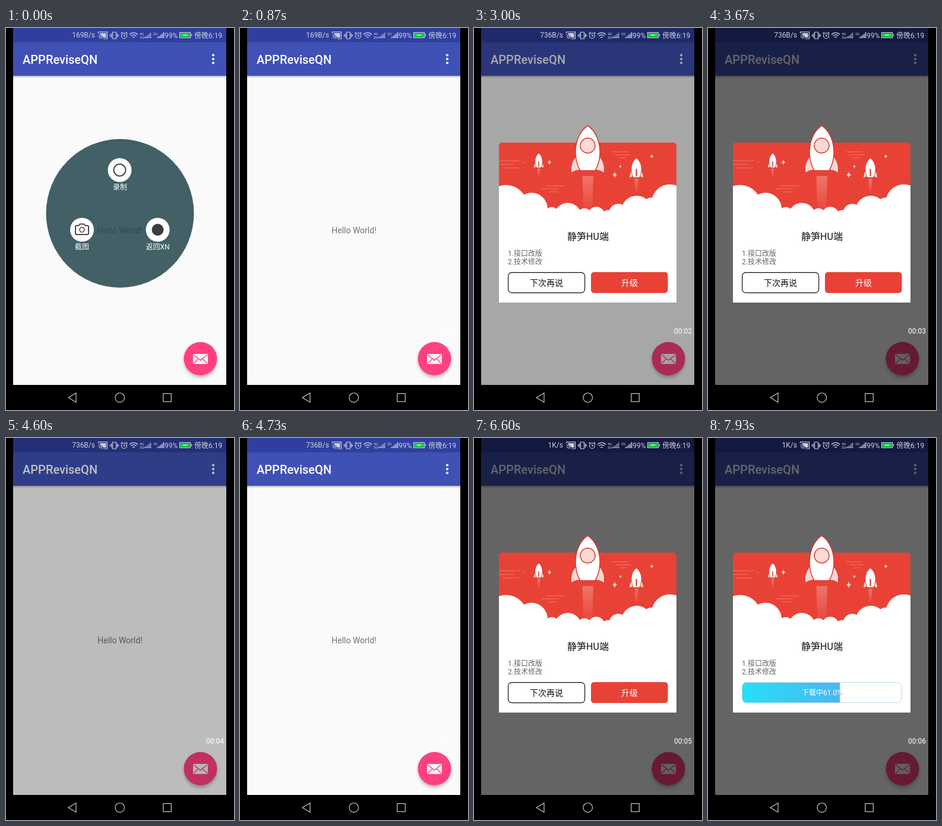
These frames come from a looping animation (384 by 640 pixels, 8000 ms). An HTML page:

```html
<!DOCTYPE html>
<html lang="zh">
<head>
<meta charset="utf-8">
<title>Update dialog</title>
<style>
html, body { margin: 0; width: 100%; height: 100%; overflow: hidden; background: #000; }
#stage { position: relative; width: 384px; height: 640px; overflow: hidden; background: #000;
  font: 12px Roboto, "Noto Sans CJK SC", "Noto Sans CJK", sans-serif; }
#stage > *, .dialog > * { position: absolute; }
svg { left: 0; top: 0; display: block; }
.mid { text-anchor: middle; }

.scrim { animation: scrim 8s linear infinite; }
@keyframes scrim {
  0%, 35.875% { opacity: 0; }
  36.7% { opacity: .2; }
  39.125%, 55% { opacity: .6; }
  57.5% { opacity: .25; }
  59.125%, 75.875% { opacity: 0; }
  76.625% { opacity: .2; }
  79.125%, 100% { opacity: .6; }
}

.menu { transform-origin: 192px 311px; animation: close 8s linear infinite; }
@keyframes close {
  0%, .5% { opacity: 1; transform: none; }
  2.5%, 100% { opacity: 0; transform: scale(.75); }
}

.ripple { fill: #fff; opacity: 0; transform-origin: 327.5px 554px; animation: ripple 8s linear infinite; }
@keyframes ripple {
  0%, 32.7% { opacity: 0; transform: scale(.3); }
  34% { opacity: .2; transform: scale(.8); }
  35.8% { opacity: .15; transform: scale(1); }
  36.7% { opacity: 0; transform: scale(1); }
  36.8%, 72.4% { opacity: 0; transform: scale(.3); }
  73.5% { opacity: .2; transform: scale(.8); }
  75% { opacity: .15; transform: scale(1); }
  76.4%, 100% { opacity: 0; transform: scale(1); }
}

.dialog { left: 0; top: 0; width: 384px; height: 640px; animation: dialog 8s linear infinite; }
@keyframes dialog {
  0%, 35.8% { opacity: 0; }
  36.7%, 55% { opacity: 1; }
  57.4%, 75.6% { opacity: 0; }
  76.6%, 100% { opacity: 1; }
}

/* One-line windows onto a column of lines */
.window { height: 14px; line-height: 14px; overflow: hidden; white-space: nowrap; }
.window > div { animation: 8s step-end infinite; }
.speed { left: 90px; top: 5px; width: 60px; text-align: right; color: #ccd0dc; }
.speed > div { animation-name: speed; }
@keyframes speed {
  0% { transform: none; }
  25% { transform: translateY(-14px); }
  62.5%, 100% { transform: translateY(-28px); }
}
.timer { left: 337px; top: 501px; color: #fff; animation: recording 8s step-end infinite; }
.timer > div { animation-name: seconds; }
@keyframes recording { 0% { opacity: 0; } 10.875%, 100% { opacity: 1; } }
@keyframes seconds {
  0% { transform: none; }
  20.875% { transform: translateY(-14px); }
  32.5% { transform: translateY(-28px); }
  45% { transform: translateY(-42px); }
  55.875% { transform: translateY(-56px); }
  72.5% { transform: translateY(-70px); }
  90%, 100% { transform: translateY(-84px); }
}

.choice { animation: choice 8s step-end infinite; }
@keyframes choice { 0% { visibility: visible; } 90%, 100% { visibility: hidden; } }
.bar { left: 57px; top: 409px; width: 270px; height: 35px; border-radius: 8px; overflow: hidden;
  background: #fff; color: #8fb9d8; animation: bar 8s step-end infinite; }
@keyframes bar { 0% { visibility: hidden; } 90%, 100% { visibility: visible; } }
.bar::after { content: ""; position: absolute; inset: 0; border: 1px solid #bcd9ea; border-radius: 8px; }
.fill { position: absolute; left: 0; top: 0; height: 35px; overflow: hidden; color: #fff;
  background: linear-gradient(90deg, #25e0f8, #4cb6f0); animation: fill 8s infinite; }
@keyframes fill {
  0% { width: 0; animation-timing-function: step-end; }
  92.5% { width: 0; animation-timing-function: steps(8, jump-start); }
  99.125%, 100% { width: 164.7px; }
}
.bar .window { position: absolute; left: 0; top: 11px; width: 270px; text-align: center; }
.bar .window > div { animation: percent 8s infinite; }
@keyframes percent {
  0% { transform: none; animation-timing-function: step-end; }
  92.5% { transform: none; animation-timing-function: steps(8, jump-start); }
  99.125%, 100% { transform: translateY(-112px); }
}
</style>
</head>
<body>
<div id="stage">
  <svg width="384" height="640">
    <defs>
      <linearGradient id="shade" x2="0" y2="1">
        <stop stop-color="#000" stop-opacity=".28"/><stop offset="1" stop-color="#000" stop-opacity="0"/>
      </linearGradient>
      <filter id="blur" x="-30%" y="-30%" width="160%" height="160%"><feGaussianBlur stdDeviation="3"/></filter>
    </defs>
    <rect x="12" y="80" width="359" height="518" fill="#fafafa"/>
    <text class="mid" x="192" y="344" font-size="14" fill="#737373">Hello World!</text>
    <rect x="12" width="359" height="24" fill="#303f9f"/>
    <rect x="12" y="24" width="359" height="56" fill="#3f51b5"/>
    <rect x="12" y="80" width="359" height="4" fill="url(#shade)"/>
    <g fill="#fff">
      <text x="28" y="60" font-size="20" font-weight="500">APPReviseQN</text>
      <circle cx="349" cy="45.5" r="2.1"/><circle cx="349" cy="52" r="2.1"/><circle cx="349" cy="58.5" r="2.1"/>
    </g>

    <circle cx="327.5" cy="558" r="27" opacity=".3" filter="url(#blur)"/>
    <circle cx="327.5" cy="554" r="28" fill="#ff4081"/>
    <circle class="ripple" cx="327.5" cy="554" r="28"/>
    <rect x="315" y="546" width="25" height="17" rx="1.5" fill="#f2f2f2"/>
    <path d="M316 547.5L327.5 556.5L339 547.5M316 562L323.5 554.5M339 562L331.5 554.5"
      fill="none" stroke="#ff4081" stroke-width="1.4"/>
    <rect class="scrim" x="12" width="359" height="598"/>

    <!-- status icons -->
    <g fill="none" stroke="#ccd0dc" stroke-width="1.2">
      <path d="M155.5 9V6.5H170.5V18H164M155.5 11.5a6.5 6.5 0 0 1 6.5 6.5M155.5 14.5a3.5 3.5 0 0 1 3.5 3.5"/>
      <path d="M158.5 9H168V15.5H164.5Z" fill="#ccd0dc"/>
      <path d="M179.5 7H185.5V18H179.5ZM177.5 9V16M187.5 9V16M175.5 11V14M189.3 11V14"/>
      <circle cx="199" cy="13" r="4.5"/>
      <path d="M199 10.5V13.3H201M193.5 9.5L196 7M202 7L204.500 9.5"/>
      <path d="M208 11a9.5 9.5 0 0 1 14 0M210.5 13.5a6 6 0 0 1 9 0M213 16a3 3 0 0 1 4 0"/>
      <path d="M233.5 17V15M236 17V13.5M238.5 17V12M241 17V10M243.5 17V8" stroke-width="1.5" stroke-dasharray="2 .6"/>
      <path d="M255.5 17V15M258 17V13.5M260.5 17V11.5M263 17V9.5M265.5 17V7" stroke-width="1.5"/>
      <path d="M292.5 7.5H310.5V16.5H292.5ZM312.5 10V14"/>
    </g>
    <rect x="293.5" y="8.5" width="16" height="7" fill="#12d048"/>
    <path d="M298 12H305" stroke="#e8ffe8" stroke-width="1.3"/>
    <g fill="#ccd0dc">
      <text x="225" y="11.5" font-size="6">4G</text>
      <text x="225" y="18" font-size="6">2G</text>
      <text x="248" y="11.5" font-size="6">2G</text>
      <text x="267" y="17">99%</text>
      <text x="317" y="17">傍晚6:19</text>
    </g>

    <!-- navigation bar -->
    <g fill="none" stroke="#ccc" stroke-width="1.2">
      <path d="M118 611.5V627L105 619.3Z"/><circle cx="191.7" cy="619.3" r="7.8"/>
      <rect x="264.8" y="612.5" width="13.5" height="13.5"/>
    </g>
  </svg>

  <div class="window speed"><div>169B/s<br>736B/s<br>1K/s</div></div>

  <svg class="menu" width="384" height="640">
    <circle cx="192" cy="310.5" r="124.5" fill="#22454c" fill-opacity=".85"/>
    <g fill="#fff">
      <circle cx="191.5" cy="238" r="20"/><circle cx="128" cy="338" r="20"/><circle cx="255.5" cy="338" r="20"/>
      <g class="mid">
        <text x="192" y="271">录制</text><text x="128" y="371">截图</text><text x="255.5" y="371">返回XN</text>
      </g>
    </g>
    <g fill="none" stroke="#4a4a4a" stroke-width="2">
      <circle cx="191.5" cy="238" r="10"/>
      <path d="M119 331H122.5L124.5 328.5H131.5L133.5 331H137a2 2 0 0 1 2 2V344a2 2 0 0 1-2 2H119a2 2 0 0 1-2-2V333a2 2 0 0 1 2-2Z"/>
      <circle cx="128" cy="338" r="4" stroke-width="1.6"/>
    </g>
    <circle cx="255.5" cy="338" r="10" fill="#3c3c3c"/>
  </svg>

  <div class="dialog">
    <svg width="384" height="640">
      <defs>
        <linearGradient id="flame" x2="0" y2="1">
          <stop stop-color="#f0857a" stop-opacity=".75"/><stop offset="1" stop-color="#f0857a" stop-opacity=".1"/>
        </linearGradient>
        <clipPath id="card"><path d="M42 460V197a5 5 0 0 1 5-5H336a5 5 0 0 1 5 5V460Z"/></clipPath>
        <path id="spark" d="M0-5Q.6-.6 4 0Q.6.6 0 5Q-.6.6-4 0Q-.6-.6 0-5"/>
        <g id="mini" stroke="#d8382c" stroke-width=".8">
          <path d="M-3 32H3L2 52H-2Z" fill="url(#flame)" stroke="none"/>
          <path d="M-7 19Q-12 24-11 31L-5 28ZM7 19Q12 24 11 31L5 28Z" fill="#f8d6d2"/>
          <path d="M0 0C6 4 9 12 8 20Q7 26 5 30H-5Q-7 26-8 20C-9 12-6 4 0 0Z" fill="#fff"/>
          <path d="M0 17V28" stroke-width="2"/>
        </g>
      </defs>
      <g clip-path="url(#card)">
        <rect x="42" y="192" width="299" height="268" fill="#e84237"/>
        <path d="M42 222.5H78M42 228.5H66M48 234.5H76M82 225H86M122 264.5H153M114 269.5H143M126 274.5H140M232 207.5H260M238 212.5H264M244 217.5H256"
          stroke="#ff9c92" stroke-opacity=".4" stroke-width="1.5"/>
        <g fill="#f8d0cc">
          <use href="#spark" x="127" y="225"/><use href="#spark" transform="translate(237 246) scale(1.15)"/>
          <use href="#spark" transform="translate(246.5 232) scale(.6)"/><use href="#spark" transform="translate(299.5 215) scale(.8)"/>
        </g>
        <use href="#mini" transform="translate(109 210) scale(.75 .8)"/>
        <use href="#mini" transform="translate(273.5 218) scale(1.05 1.08)"/>
        <path d="M182.5 248H201L199 304H184.5Z" fill="url(#flame)"/>
        <g fill="#fff">
          <circle cx="54" cy="299" r="36"/><circle cx="97" cy="303" r="27"/><circle cx="131" cy="312" r="12"/>
          <circle cx="158" cy="316" r="23"/><circle cx="186" cy="314" r="12"/><circle cx="206" cy="314" r="14.5"/>
          <circle cx="226" cy="316" r="11"/><circle cx="243" cy="310" r="15.5"/><circle cx="274" cy="307" r="26"/>
          <circle cx="300" cy="302" r="18"/><circle cx="330" cy="293" r="31"/>
          <rect x="42" y="307" width="299" height="153"/>
        </g>
      </g>
      <g stroke="#d8382c" stroke-width="1.5" stroke-linejoin="round">
        <path d="M173 214C165 222 162 232 164 243Q170 238 179 238ZM210 214C218 222 221 232 219 243Q213 238 204 238Z" fill="#f8d6d2" stroke-width="1"/>
        <path d="M191.5 163.5C206 173 213 193 212 212C211 224 207 234 204 239H179C176 234 172 224 171 212C170 193 177 173 191.5 163.5Z" fill="#fff"/>
        <circle cx="191.5" cy="197" r="12.5" fill="#f8dad6"/>
      </g>
      <text class="mid" x="192" y="354.5" font-size="16" fill="#111">静笋HU端</text>
      <g fill="#666"><text x="57" y="382">1.接口改版</text><text x="57" y="396">2.技术修改</text></g>
      <g class="choice mid" font-size="14" font-weight="500">
        <rect x="57.6" y="409.6" width="129" height="34" rx="6" fill="none" stroke="#111" stroke-width="1.2"/>
        <text x="122" y="432" fill="#111">下次再说</text>
        <rect x="197" y="409" width="129.5" height="35" rx="5" fill="#e84237"/>
        <text x="262" y="432" fill="#fff" font-weight="400">升级</text>
      </g>
    </svg>
    <div class="bar">
      <div class="window"><div>下载中0.0%<br>下载中7.0%<br>下载中15.0%<br>下载中22.0%<br>下载中30.0%<br>下载中38.0%<br>下载中45.0%<br>下载中53.0%<br>下载中61.0%</div></div>
      <div class="fill"><div class="window"><div>下载中0.0%<br>下载中7.0%<br>下载中15.0%<br>下载中22.0%<br>下载中30.0%<br>下载中38.0%<br>下载中45.0%<br>下载中53.0%<br>下载中61.0%</div></div></div>
    </div>
  </div>

  <div class="window timer"><div>00:00<br>00:01<br>00:02<br>00:03<br>00:04<br>00:05<br>00:06</div></div>
</div>
</body>
</html>
```
